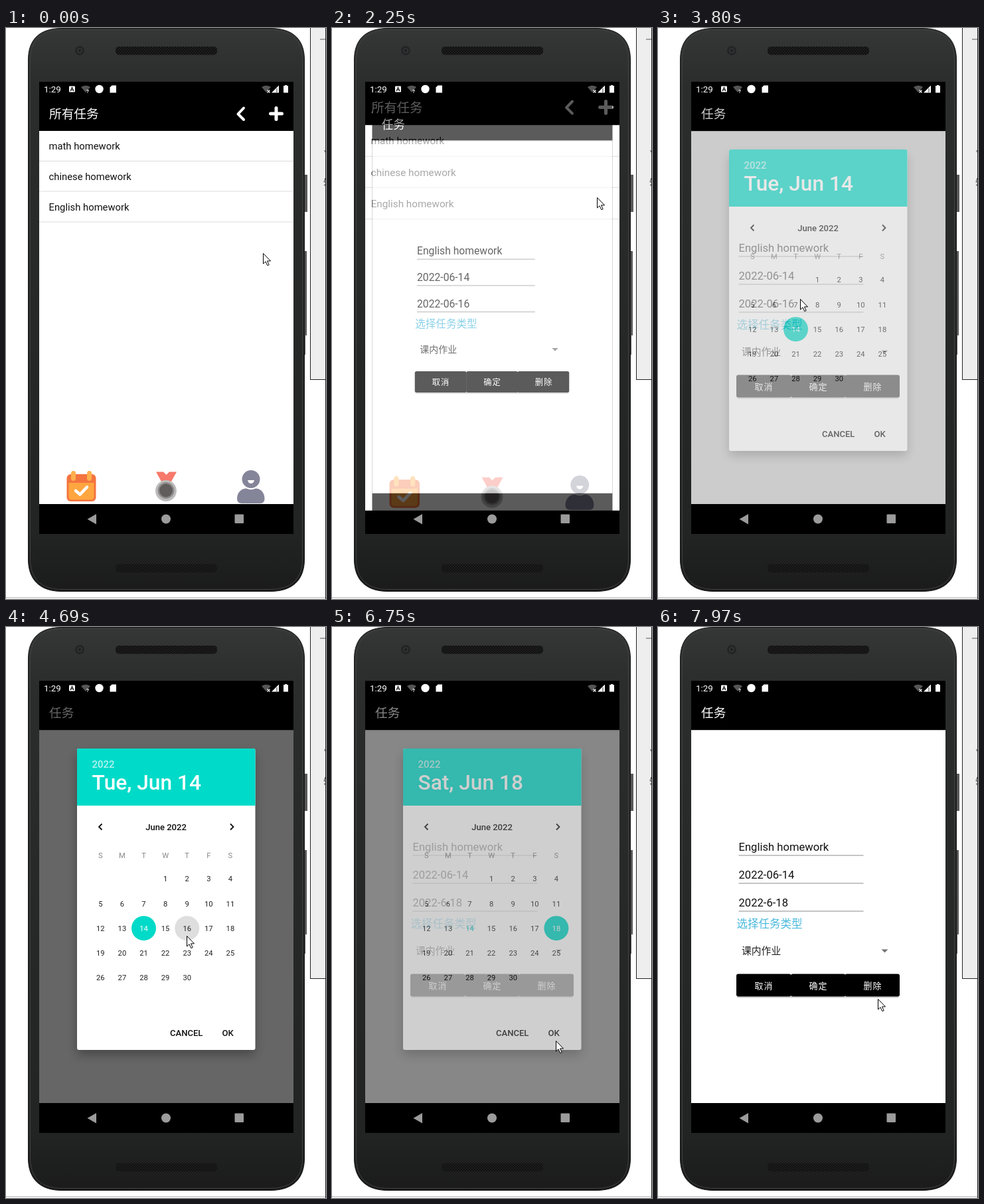
An HTML page that plays this animation: 482x860 px, repeating every 8 s.

```html
<!DOCTYPE html>
<html lang="zh-CN">
<head>
<meta charset="utf-8">
<style>
html, body { margin: 0; width: 100%; height: 100%; overflow: hidden; background: #fff; }
svg { display: block; width: 482px; height: 860px; }
text { font-family: Roboto, "Noto Sans CJK SC", "Noto Sans CJK", "Noto Sans", sans-serif; }
.bar { font-size: 18.7px; fill: #fff; }
.row { font-size: 14.8px; fill: #111; }
.field { font-size: 16.6px; fill: #111; }
.btn { font-size: 13px; letter-spacing: 1.1px; fill: #fff; text-anchor: middle; }
.cell { font-size: 11.2px; fill: #222; text-anchor: middle; }
.med { font-weight: 500; font-size: 13.05px; fill: #111; }
</style>
</head>
<body>
<svg viewBox="0 0 482 860">
  <defs>
    <linearGradient id="body" x1="0" y1="0" x2="0" y2="1">
      <stop offset="0" stop-color="#353636"/>
      <stop offset=".1" stop-color="#2b2c2c"/>
      <stop offset=".9" stop-color="#222323"/>
      <stop offset="1" stop-color="#1b1b1b"/>
    </linearGradient>
    <pattern id="mesh" width="4" height="4" patternUnits="userSpaceOnUse">
      <rect width="4" height="4" fill="#101010"/>
      <circle cx="1" cy="1" r=".8" fill="#2e2e2e"/>
      <circle cx="3" cy="3" r=".8" fill="#2e2e2e"/>
    </pattern>
    <clipPath id="screen"><rect x="50" y="81" width="383" height="681"/></clipPath>
    <filter id="shade" x="-20%" y="-20%" width="140%" height="140%">
      <feGaussianBlur stdDeviation="8"/>
    </filter>
  </defs>

  <rect width="482" height="860" fill="#fff"/>
  <path d="M0 858H482" stroke="#d4d4d4" stroke-width="2"/>
  <rect x="458.5" y="-2" width="23" height="531.5" fill="#eee" stroke="#222"/>
  <path d="M481.5 0V860" stroke="#222"/>
  <path d="M473 17H481" stroke="#888" stroke-width="1.5"/>
  <path d="M479.5 184L481.5 188M481 226L479 232H481M480 235V238" stroke="#444" fill="none"/>

  <path d="M449 221h5v56h-5zM449 336h4v127h-4zM449 463h2v29h-2z" fill="#5a5a5a"/>
  <path id="case" d="M84 .5H398C432 .5 449.500 17 449.500 48V800C449.500 832 431 848.500 398 848.500H84C52 848.500 33.500 832 33.500 800V48C33.500 17 51 .5 84 .5Z" fill="url(#body)" stroke="#141414"/>
  <path d="M85 3H397C430 3 446.500 19 446.500 49V799C446.500 830 430 845.500 397 845.500H85C53 845.500 36.500 830 36.500 799V49C36.500 19 53 3 85 3Z" fill="none" stroke="#3f4040" stroke-width="1"/>
  <circle cx="111" cy="34" r="7" fill="#242424"/>
  <circle cx="111" cy="34" r="4" fill="#303132"/>
  <circle cx="111" cy="34" r="1.800" fill="#191a1c"/>
  <rect x="165" y="28" width="153" height="12.500" rx="5" fill="url(#mesh)"/>
  <rect x="165" y="807.500" width="153" height="12.500" rx="5" fill="url(#mesh)"/>

  <g clip-path="url(#screen)">
    <rect x="50" y="81" width="383" height="681" fill="#000"/>
    <g id="list">
      <rect x="40" y="70" width="403" height="705" fill="#000"/>
      <rect x="50" y="155" width="383" height="562" fill="#fff"/>
      <text class="bar" x="65" y="136">所有任务</text>
      <path d="M358 120.500L349.500 129.500L358 138" fill="none" stroke="#fff" stroke-width="4" stroke-linecap="round" stroke-linejoin="round"/>
      <path d="M398.500 129H415.500M407 120.500V137.500" stroke="#fff" stroke-width="5" stroke-linecap="round"/>
      <rect id="press" x="50" y="246" width="383" height="45.500"/>
      <path d="M50 200.500H433M50 246H433M50 292H433" stroke="#dcdcdc"/>
      <text class="row" x="64.500" y="183">math homework</text>
      <text class="row" x="64.500" y="229">chinese homework</text>
      <text class="row" x="64.500" y="274.500">English homework</text>
      <g>
        <rect x="91.500" y="672" width="44" height="41" rx="6" fill="#f4743f"/>
        <path d="M94.500 685H132.500V706Q132.500 710.500 128 710.500H99Q94.500 710.500 94.500 706Z" fill="#ffa640"/>
        <rect x="98" y="667" width="7" height="15" rx="3.500" fill="#ffb04c"/>
        <rect x="122" y="667" width="7" height="15" rx="3.500" fill="#ffb04c"/>
        <path d="M105 697L111.500 702.500L122 691.500" fill="none" stroke="#fff" stroke-width="4.500" stroke-linecap="round" stroke-linejoin="round"/>
      </g>
      <g>
        <path d="M226 668.500H237L241.500 673L246 668.500H257L249 683H234Z" fill="#f7796b"/>
        <circle cx="241" cy="697" r="16" fill="#bdbcbc"/>
        <circle cx="241" cy="696.500" r="12.500" fill="#8f8c8c"/>
        <circle cx="241" cy="696.500" r="10" fill="#625d5d"/>
      </g>
      <g fill="#85859a">
        <circle cx="369" cy="679.500" r="13.500"/>
        <path d="M348 709C348 699 355 693.500 362 693.500Q369 697 376 693.500C383 693.500 389.500 699 389.500 709Q389.500 716 383 716H355Q348 716 348 709Z"/>
        <path d="M364 681H374Q373 686 369 686Q365 686 364 681Z" fill="#fff"/>
      </g>
    </g>

    <g id="form">
      <rect x="50" y="81" width="383" height="681" fill="#000"/>
      <rect x="50" y="155" width="383" height="562" fill="#fff"/>
      <path d="M50 155.500H433" stroke="#ccc"/>
      <text class="bar" x="65" y="136">任务</text>
      <text class="field" x="121.500" y="336.500">English homework</text>
      <text class="field" x="121.500" y="379">2022-06-14</text>
      <text class="field" x="121.500" y="420.500" id="due"></text>
      <path d="M121.500 344H309.500M121.500 386H309.500M121.500 428H309.500" stroke="#8a8a8a"/>
      <text x="118.500" y="453" font-size="16.500" fill="#49b8dc">选择任务类型</text>
      <text x="126" y="493" font-size="14.800" fill="#222">课内作业</text>
      <path d="M336.500 485.500H346.500L341.500 490.500Z" fill="#757575"/>
      <path d="M119 525H363V556Q363 558.500 361 558.500H121Q119 558.500 119 556Z" fill="#000" opacity=".2"/>
      <rect x="118" y="522.500" width="82.500" height="34" rx="3"/>
      <rect x="200" y="522.500" width="82.500" height="34" rx="3"/>
      <rect x="281.500" y="522.500" width="82.500" height="34" rx="3"/>
      <text class="btn" x="159.500" y="544.500">取消</text>
      <text class="btn" x="241.500" y="544.500">确定</text>
      <text class="btn" x="323.500" y="544.500">删除</text>
    </g>

    <rect id="dim" x="50" y="81" width="383" height="636"/>

    <g id="dialog">
      <rect x="107" y="192" width="268" height="452" rx="4" opacity=".3" filter="url(#shade)"/>
      <rect x="107" y="183" width="268.500" height="454" rx="3" fill="#fff"/>
      <path d="M107 269V186Q107 183 110 183H372.500Q375.500 183 375.500 186V269Z" fill="#00dac8"/>
      <text class="med" x="129.500" y="212" style="font-size:14.9px;fill:#fff" opacity=".72">2022</text>
      <text class="med" x="129.500" y="245" style="font-size:31.7px;fill:#fff" id="head"></text>
      <text class="med" x="241" y="305.500" text-anchor="middle">June 2022</text>
      <path d="M144.500 296.500L140 301L144.500 305.500M338 296.500L342.500 301L338 305.500" fill="none" stroke="#111" stroke-width="1.800"/>
      <circle id="held" r="18.500" fill="#dedede"/>
      <circle id="pick" r="18.500" fill="#00dac8"/>
      <g id="cells"></g>
      <text class="med" x="247" y="615.500">CANCEL</text>
      <text class="med" x="325.500" y="615.500">OK</text>
    </g>

    <g fill="#fff">
      <text x="57" y="97" font-size="13.400" fill="#fff">1:29</text>
      <rect x="95" y="87.500" width="9" height="9" rx="1"/>
      <path d="M97 95L99.500 89.500L102 95M98 93.300H101" fill="none" stroke="#000" stroke-width="1.100"/>
      <path d="M113 89Q120 84.500 127 89L120 97Z" fill="#555"/>
      <text x="121" y="98" font-size="8" font-weight="700">?</text>
      <circle cx="140.500" cy="92" r="6.200"/>
      <path d="M159.500 86.500H166V97.500H156.500V89.500Z"/>
      <path d="M385 89Q392 84.500 399 89L392 97Z" fill="#555"/>
      <path d="M393.500 93.500L397.500 97.500M397.500 93.500L393.500 97.500" stroke="#fff" stroke-width="1.200"/>
      <path d="M411 86.500V97.500H400Z"/>
      <path d="M408 91V97" stroke="#000" stroke-width=".8"/>
      <path d="M420 86H423V87H425V97.500H418V87H420Z"/>
    </g>
    <g fill="#9b9b9b">
      <path d="M136 732V747.500L122.500 739.700Z"/>
      <circle cx="241" cy="739.500" r="7"/>
      <rect x="344.500" y="732.500" width="13.500" height="13.500" rx="1"/>
    </g>
  </g>
  <path id="mouse" d="M.5 .5V16L4 12.800L6.800 18.700L9.200 17.600L6.500 11.900H11.500Z" fill="#fff" stroke="#000"/>
</svg>
<script>
const LOOP = 8000, TICK = 46.88;
const $ = id => document.getElementById(id);
const set = (id, name, value) => $(id).setAttribute(name, value);
const days = [];

function addCell(x, y, label, fill, size) {
  const el = document.createElementNS("http://www.w3.org/2000/svg", "text");
  el.setAttribute("class", "cell");
  el.setAttribute("x", x);
  el.setAttribute("y", y + 4);
  el.textContent = label;
  if (fill) el.style.fill = fill;
  $("cells").append(el);
  return el;
}

// June 2022 starts on a Wednesday
function spot(day) {
  const i = day + 2;
  return [142.3 + 32.6 * (i % 7), 379.3 + 37.2 * Math.floor(i / 7)];
}

[..."SMTWTFS"].forEach((c, i) => addCell(142.3 + 32.6 * i, 344, c, "#888"));
for (let d = 1; d <= 30; d++) days[d] = addCell(...spot(d), d);

// Linear track through [tick, value...] points
function track(n, keys) {
  if (n <= keys[0][0]) return keys[0].slice(1);
  for (let i = 1; i < keys.length; i++) {
    const a = keys[i - 1], b = keys[i];
    if (n <= b[0]) {
      const k = (n - a[0]) / (b[0] - a[0]);
      return a.slice(1).map((v, j) => v + (b[j + 1] - v) * k);
    }
  }
  return keys[keys.length - 1].slice(1);
}

const mouse = [
  [0, 387, 339], [1, 387, 339], [2, 380, 335], [5, 380, 335], [8, 399, 256],
  [18, 399, 256], [19, 399, 255], [51, 399, 255], [57, 310, 355], [63, 224, 442],
  [64, 221, 395], [67, 221, 395], [69, 214, 408], [88, 214, 408], [93, 258, 456],
  [96, 272, 465], [109, 272, 465], [114, 309, 463], [119, 340, 457], [125, 340, 457],
  [131, 343, 553], [137, 337, 623], [162, 337, 623], [166, 333, 585], [170, 331, 560]
];
// tick, scale progress, opacity
const enter = [[46, 0, 0], [47, .22, .18], [48, .635, .64], [49, .86, 1], [50, .93, 1], [52, .98, 1], [55, 1, 1]];
// tick, dialog opacity, dimming
const popup = [
  [80, 0, 0], [81, .55, .2], [82, .75, .31], [83, .88, .42], [84, .95, .51], [86, 1, .6],
  [143, 1, .6], [144, .6, .47], [145, .33, .27], [146, .12, .1], [147, 0, 0]
];
const ripple = [[30, 0], [31, .05], [33, .12], [45, .12], [46, 0]];

const zoom = s => `translate(241 421) scale(${s}) translate(-241 -421)`;

function circle(id, day) {
  set(id, "visibility", day ? "inherit" : "hidden");
  if (!day) return;
  const [x, y] = spot(day);
  set(id, "cx", x);
  set(id, "cy", y);
}

function draw(time) {
  const n = Math.floor((time % LOOP + 6) / TICK);
  set("mouse", "transform", `translate(${track(n, mouse)})`);
  set("press", "opacity", track(n, ripple)[0]);

  const [p, shown] = track(n, enter);
  set("list", "transform", zoom(1 + .052 * p));
  set("form", "transform", zoom(.85 + .15 * p));
  set("form", "opacity", shown);
  $("due").textContent = n < 144 ? "2022-06-16" : "2022-6-18";

  const [alpha, dim] = track(n, popup);
  set("dialog", "opacity", alpha);
  set("dim", "opacity", dim);
  const day = n < 103 ? 14 : n < 125 ? 16 : 18;
  $("head").textContent = { 14: "Tue", 16: "Thu", 18: "Sat" }[day] + ", Jun " + day;
  circle("pick", day);
  circle("held", n >= 100 && n < 103 ? 16 : n >= 122 && n < 125 ? 18 : 0);
  for (const d of [14, 16, 18])
    days[d].style.fill = d === day ? "#fff" : d === 14 ? "#1fc4b8" : "#222";
}

let start = null;
function loop(now) {
  if (start === null) start = now;
  draw(now - start);
  requestAnimationFrame(loop);
}
draw(0);
requestAnimationFrame(loop);
</script>
</body>
</html>
```
